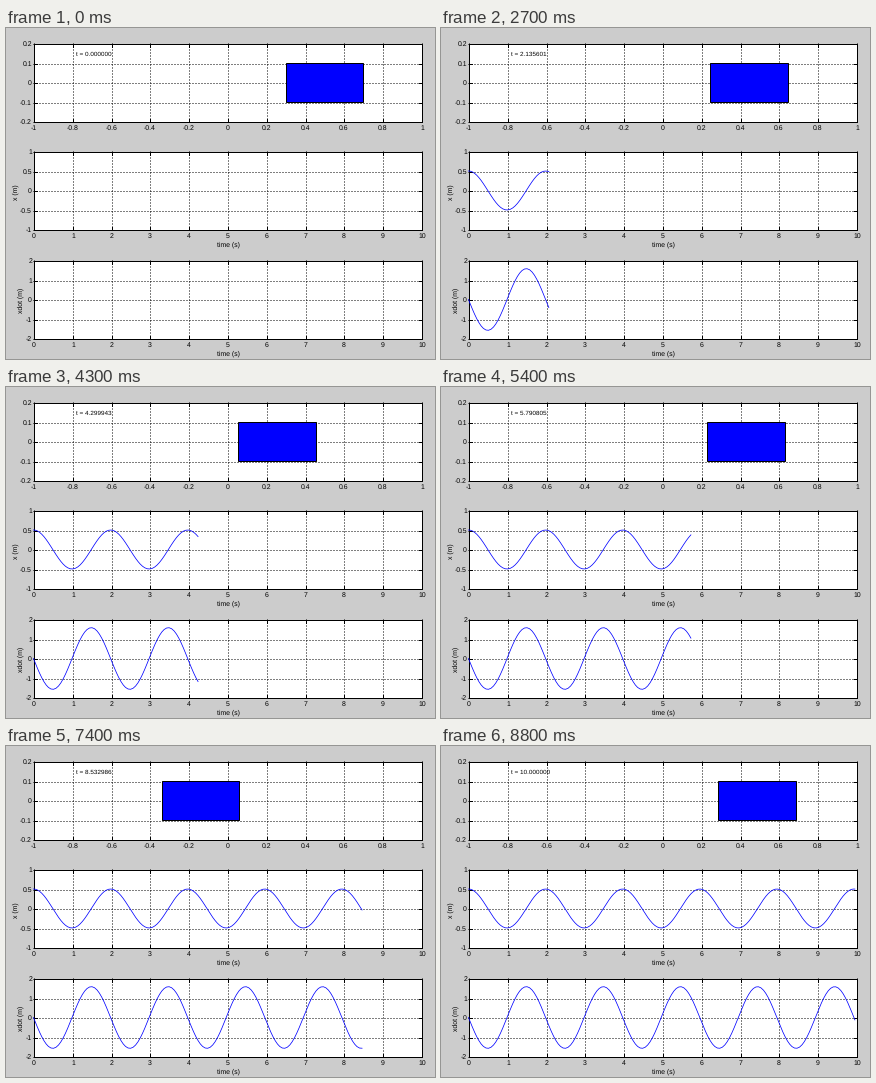
Animation, 429 px wide and 331 px high, one loop 8.9 s. Source, as a matplotlib script:

```python
import numpy as np
import matplotlib.pyplot as plt
from matplotlib.animation import FuncAnimation
from matplotlib.patches import Rectangle

W, H, DPI = 429, 331, 100
PX = 72 / DPI
FRAMES = 89
RATE, LAG = 2.19, 3.1          # solver points per frame, initial hold
LEFT, RIGHT, HEIGHT = 27.5, 415.5, 78
OMEGA = np.sqrt(10)
T_END, RTOL, FLOOR = 10.0, 1e-3, 1e-3

plt.rcParams["font.family"] = "Liberation Sans"
plt.rcParams["text.hinting"] = "none"


def solve():
    """Adaptive Dormand-Prince run of x'' = -10 x, four output points per step.

    The state is held as one complex number u = x - i v / omega.
    """
    t, u = 0.0, 0.5 + 0j
    ts, us = [t], [u]
    h = 0.8 * RTOL ** 0.2 / (OMEGA ** 2 * 0.5 / FLOOR)
    while t < T_END:
        last = failed = False
        h = min(h, 1.0)
        if 1.1 * h >= T_END - t:
            h, last = T_END - t, True
        while True:
            z = 1j * OMEGA * h
            new = u * (1 + z + z**2 / 2 + z**3 / 6 + z**4 / 24
                       + z**5 / 120 + z**6 / 600)
            e = u * z**5 * (-97 + 39 * z - 5 * z**2) / 120000
            err = max(
                abs(e.real) / max(abs(u.real), abs(new.real), FLOOR),
                OMEGA * abs(e.imag)
                / max(OMEGA * abs(u.imag), OMEGA * abs(new.imag), FLOOR))
            if err <= RTOL:
                break
            h *= 0.5 if failed else max(0.1, 0.8 * (RTOL / err) ** 0.2)
            failed, last = True, False
        for s in (0.25, 0.5, 0.75):
            ts.append(t + s * h)
            us.append(u * np.exp(s * z))
        t = T_END if last else t + h
        u = new
        ts.append(t)
        us.append(u)
        if not failed:
            h /= max(0.2, 1.25 * (err / RTOL) ** 0.2)
    us = np.array(us)
    return np.array(ts), us.real, -OMEGA * us.imag


fig = plt.figure(figsize=(W / DPI, H / DPI), dpi=DPI, facecolor="0.8")
ax = fig.add_axes([0, 0, 1, 1])
ax.set_xlim(0, W)
ax.set_ylim(H, 0)
ax.axis("off")


def line(x0, y0, x1, y1, dotted=False):
    ax.plot([x0, x1], [y0, y1], color="black", lw=PX, zorder=2,
            ls=(0, (1, 2)) if dotted else "-", dash_capstyle="butt",
            solid_capstyle="projecting")


def label(x, y, s, ha="center", size=6.9, rotation=0):
    va = "center" if rotation else "center_baseline"
    return ax.text(x, y, s, ha=ha, va=va, fontsize=size * PX,
                   rotation=rotation, color="black", zorder=5)


def snap(p):
    return np.floor(p + 1e-6) + 0.5


class Panel:
    def __init__(self, top, xlim, ylim, xticks, yticks):
        self.top, self.bottom = top, top + HEIGHT
        self.xlim, self.ylim = xlim, ylim
        ax.add_patch(Rectangle((LEFT, top), RIGHT - LEFT, HEIGHT, fc="white",
                               ec="none", zorder=1))
        for v in xticks:
            x = snap(self.x(v))
            line(x, top - 0.5, x, self.bottom, True)
            line(x, top, x, top + 3)
            line(x, self.bottom, x, self.bottom - 3)
            label(x + 0.5, self.bottom + 6, f"{v:g}")
        for v in yticks:
            y = snap(self.y(v))
            line(LEFT - 0.5, y, RIGHT, y, True)
            line(LEFT, y, LEFT + 3, y)
            line(RIGHT, y, RIGHT - 3, y)
            label(26, y + 0.3, f"{v:g}", "right")
        for y in (top, self.bottom):
            line(LEFT, y, RIGHT, y)
        for x in (LEFT, RIGHT):
            line(x, top, x, self.bottom)

    def x(self, v):
        a, b = self.xlim
        return LEFT + (v - a) / (b - a) * (RIGHT - LEFT)

    def y(self, v):
        a, b = self.ylim
        return self.bottom - (v - a) / (b - a) * HEIGHT

    def curve(self):
        return ax.plot([], [], color="blue", lw=0.75 * PX, zorder=4)[0]


fifths = [i / 5 for i in range(-5, 6)]
seconds = range(11)
scene = Panel(15.5, (-1, 1), (-0.2, 0.2), fifths, [-0.2, -0.1, 0, 0.1, 0.2])
pos = Panel(123.5, (0, 10), (-1, 1), seconds, [-1, -0.5, 0, 0.5, 1])
vel = Panel(232.5, (0, 10), (-2, 2), seconds, [-2, -1, 0, 1, 2])

for panel in (pos, vel):
    label(222, panel.bottom + 14.6, "time (s)")
label(9.5, 164, "x (m)", rotation=90)
label(14.5, 272.5, "xdot (m)", rotation=90)

clock = label(70, 26, "", "left", 6.4)
block = ax.add_patch(Rectangle((0, scene.y(0.1)), scene.x(0.4) - scene.x(0),
                               scene.y(-0.1) - scene.y(0.1), fc="blue",
                               ec="black", lw=PX, zorder=3))
pos_line, vel_line = pos.curve(), vel.curve()

T, X, V = solve()


def update(i):
    k = int(np.clip(round(RATE * i - LAG), 0, len(T) - 1))
    clock.set_text(f"t = {T[k]:.6f}")
    block.set_x(scene.x(X[k] - 0.2))
    # the curves trail the block by one output point
    pos_line.set_data(pos.x(T[:k]), pos.y(X[:k]))
    vel_line.set_data(vel.x(T[:k]), vel.y(V[:k]))
    return clock, block, pos_line, vel_line


anim = FuncAnimation(fig, update, frames=FRAMES, interval=100,
                     init_func=lambda: update(0), repeat=True, repeat_delay=0,
                     blit=False)
plt.show()
```
